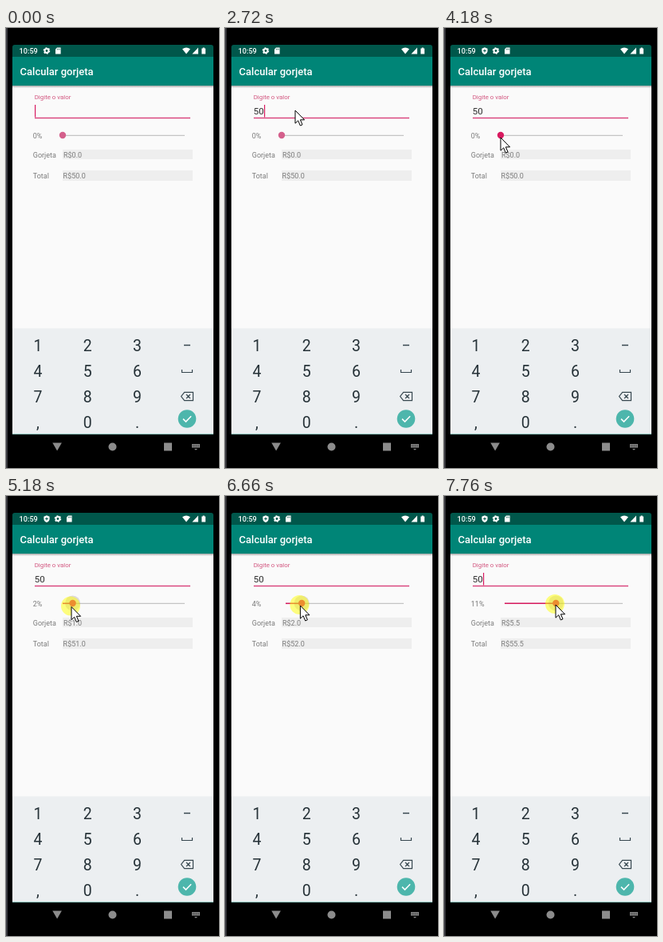
These frames come from a looping animation (267x550 px, 8 s). An HTML page:

```html
<!DOCTYPE html>
<html lang="pt">
<head>
<meta charset="utf-8">
<title>Calcular gorjeta</title>
<style>
  html, body { margin: 0; width: 100%; height: 100%; overflow: hidden; background: #000; }
  svg { display: block; width: 267px; height: 550px; font-family: Roboto, sans-serif; }
  .form { font-size: 9px; fill: #7b7b7b; }
  .keys { font-size: 19.5px; fill: #263238; text-anchor: middle; }
</style>
</head>
<body>
<svg viewBox="0 0 267 550" xmlns="http://www.w3.org/2000/svg">
  <defs>
    <linearGradient id="shade" x2="0" y2="1">
      <stop stop-color="#000" stop-opacity=".35"/>
      <stop offset="1" stop-color="#000" stop-opacity="0"/>
    </linearGradient>
  </defs>

  <!-- device -->
  <rect width="267" height="550"/>
  <path d="M1 0V550" stroke="#4c4c52" stroke-width="1.6"/>
  <path d="M8 40V24q0-3 3-3H257q3 0 3 3V40z" fill="#00574b"/>
  <rect x="8" y="72" width="252" height="304" fill="#fafafa"/>
  <rect x="8" y="36" width="252" height="36" fill="#008577"/>
  <rect x="8" y="72" width="252" height="3" fill="url(#shade)"/>

  <!-- status bar -->
  <g fill="#fff">
    <text x="16.5" y="31.8" font-size="9.2" font-weight="500">10:59</text>
    <path id="shield" d="M51 24.2l3.6 1.5v2.7q0 3.2-3.6 4.6q-3.6-1.4-3.6-4.6v-2.7z"/>
    <path id="shieldMark" d="M51 26.6v3.8M49.2 28.4h3.6" stroke="#00574b"/>
    <g id="tray">
      <circle cx="51" cy="28.5" r="2.4" fill="none" stroke="#fff" stroke-width="2"/>
      <circle cx="51" cy="28.5" r="3.7" fill="none" stroke="#fff" stroke-width="1.2" stroke-dasharray="1.9 1.974"/>
      <path d="M64 24.5h4.6v8h-6.6v-6z"/>
      <path d="M64.3 25.8v1.6M65.8 25.8v1.6M67.3 25.8v1.6" stroke="#00574b" stroke-width=".7"/>
    </g>
    <path d="M221 26.2q5-3.4 10 0l-5 6.3z"/>
    <path d="M241 24.6v7.9h-7.6z"/>
    <path d="M245.3 25.4h1.4v-1h2v1h1.4v7.2h-4.8z"/>
    <text x="17.6" y="58.8" font-size="13" font-weight="500">Calcular gorjeta</text>
  </g>

  <!-- form -->
  <text x="35.7" y="89.3" font-size="7.9" fill="#d2557f">Digite o valor</text>
  <path d="M36 112.6H231" stroke="#d9487f" stroke-width="1.5"/>
  <text id="amount" x="35.8" y="108" font-size="11.6" fill="#303030"></text>
  <rect id="caret" y="96" width="1.2" height="15.5" fill="#d81b60"/>
  <g class="form">
    <rect x="71" y="152" width="163" height="12" fill="#eee"/>
    <rect x="71" y="178" width="163" height="13" fill="#eee"/>
    <text id="percent" x="33.8" y="138"></text>
    <text x="33.8" y="161.6">Gorjeta</text>
    <text id="tip" x="72" y="161.6"></text>
    <text x="33.8" y="188.2">Total</text>
    <text id="total" x="71.6" y="188.2"></text>
  </g>
  <path id="track" stroke="#c4c4c4" stroke-width="1.2"/>
  <path id="progress" stroke="#d81b60" stroke-width="1.5"/>
  <circle id="ripple" cy="134" r="9.5" fill="#705060" fill-opacity=".2"/>
  <circle id="thumb" cy="134" r="4.2"/>

  <!-- keyboard -->
  <rect x="8" y="375.5" width="252" height="132.5" fill="#eceff1"/>
  <path d="M8 507.6H260" stroke="#8cc5bd"/>
  <g id="keys" class="keys"></g>
  <g fill="none" stroke="#37474f" stroke-width="1.2">
    <path d="M223 396.5h8" stroke-width="1.5"/>
    <path d="M220.5 427v3.5h13V427"/>
    <path d="M223.6 455.3H234.5v10.4H223.6l-4-5.2zM226 458l5 5M231 458l-5 5"/>
  </g>
  <circle cx="227" cy="488.5" r="11.3" fill="#4db6ac"/>
  <path d="M222 488.6l3.5 3.5 6.6-6.8" fill="none" stroke="#fff" stroke-width="1.5"/>

  <!-- navigation bar -->
  <g fill="#8c8c8c">
    <path d="M58.3 518.5h11.6l-5.8 10z"/>
    <circle cx="133.5" cy="523.5" r="5"/>
    <rect x="198" y="518.5" width="10" height="10"/>
    <rect x="233" y="520" width="10" height="4.6"/>
    <path d="M236 526h4l-2 1.8z"/>
    <path d="M234 521.5h8M234 523.2h8" stroke="#000" stroke-width=".7" stroke-dasharray="1 .8"/>
  </g>

  <!-- pointer -->
  <circle id="halo" r="12" fill="#ff0" fill-opacity=".5"/>
  <path id="pointer" d="M0 0V16.2L3.7 12.8L6.3 19L9 17.8L6.4 11.8H11.6Z" fill="#fff" stroke="#000" stroke-width="1"/>
</svg>
<script>
  const LOOP = 8000, STEP = 77.4;
  const SLIDER_START = 71, SLIDER_END = 224, PER_CENT = 6.3;
  const el = id => document.getElementById(id);
  const set = (id, attrs) => {
    for (const name in attrs) el(id).setAttribute(name, attrs[name]);
  };
  const show = (id, on) => set(id, { visibility: on ? 'visible' : 'hidden' });
  const say = (id, text) => { el(id).textContent = text; };

  // The caret flips at each of these times, starting visible.
  const caretFlips = [70, 620, 1090, 1570, 2100, 2560, 3180, 3720, 4180,
    4720, 5180, 5720, 6260, 6740, 7260, 7760];

  // time, x, y
  const pointerPath = [
    [620, 187, 463], [850, 87, 107], [945, 87, 107], [1085, 88, 103],
    [3110, 88, 103], [3250, 92, 104], [3490, 92, 104], [4170, 71, 137],
    [4490, 71, 137], [5170, 82, 138.5], [5260, 82, 138.5], [5325, 83, 138],
    [5490, 83, 138], [5790, 92, 137], [6640, 92, 137],
    [7110, 160.5, 137], [7410, 140, 136]
  ];

  function pointerAt(t) {
    const next = pointerPath.findIndex(key => key[0] > t);
    if (next === 0) return pointerPath[0].slice(1);
    if (next < 0) return pointerPath[pointerPath.length - 1].slice(1);
    const [t0, x0, y0] = pointerPath[next - 1], [t1, x1, y1] = pointerPath[next];
    const k = (t - t0) / (t1 - t0);
    return [x0 + (x1 - x0) * k, y0 + (y1 - y0) * k];
  }

  function render(t) {
    const stepped = Math.floor((t + 10) / STEP) * STEP;
    const [x, y] = pointerAt(stepped);
    const dragging = t >= 4560;

    const typed = t < 2640 ? '' : t < 2720 ? '5' : '50';
    say('amount', typed);
    set('caret', { x: 36 + 6.5 * typed.length });
    show('caret', caretFlips.filter(flip => flip <= t).length % 2 === 0);

    const shielded = t >= 3870;
    show('shield', shielded);
    show('shieldMark', shielded);
    set('tray', { transform: `translate(${shielded ? 14 : 0} 0)` });

    const percent = dragging ? Math.max(0, Math.round((x - SLIDER_START) / PER_CENT)) : 0;
    const tip = 50 * percent / 100;
    say('percent', percent + '%');
    say('tip', 'R$' + tip.toFixed(1));
    say('total', 'R$' + (50 + tip).toFixed(1));

    const thumbX = SLIDER_START + percent * PER_CENT;
    const trackX = percent > 3 ? 76 : SLIDER_START;
    set('track', { d: `M${trackX} 134.3H${SLIDER_END}` });
    set('progress', { d: `M${trackX} 134.3H${Math.max(trackX, thumbX)}` });
    set('thumb', { cx: thumbX, fill: t >= 4100 ? '#d81b60' : '#d4608c' });
    set('ripple', { cx: thumbX });
    show('ripple', dragging);

    set('pointer', { transform: `translate(${x} ${y})` });
    show('pointer', t >= 620);
    set('halo', { cx: x - 1, cy: y - 1 });
    show('halo', (t >= 1320 && t < 1400) || t >= 4410);
  }

  el('keys').innerHTML = ['123', '456', '789', ',0.'].map((row, r) =>
    [...row].map((key, c) =>
      `<text x="${40 + 62.3 * c}" y="${403.6 + 32 * r}">${key}</text>`).join('')).join('');

  const start = performance.now();
  function tick() {
    render((performance.now() - start) % LOOP);
    requestAnimationFrame(tick);
  }
  tick();
</script>
</body>
</html>
```
